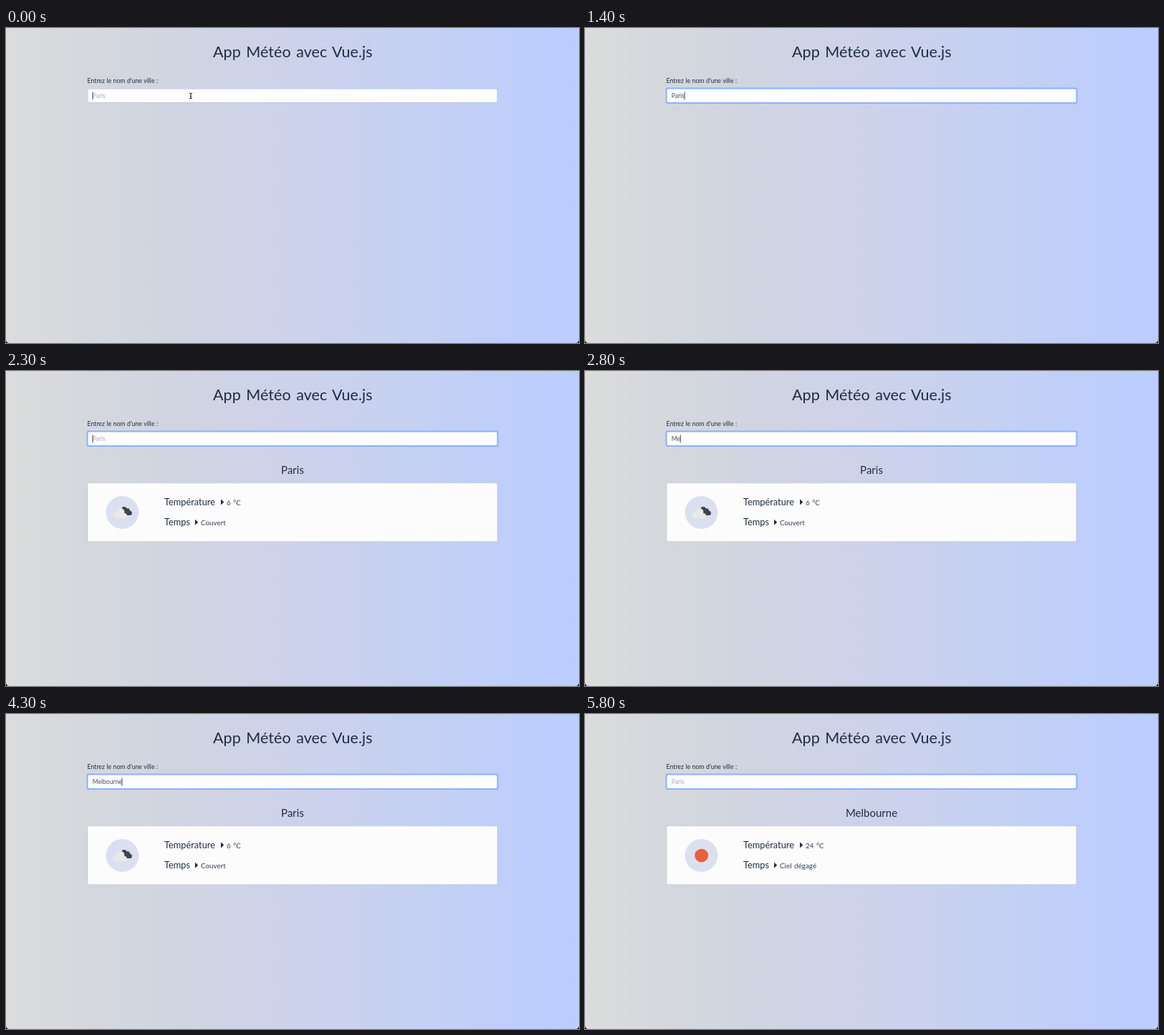
Write an HTML page that moves like this. It is 800 px wide and 441 px high and loops after 6 s.

```html
<!DOCTYPE html>
<html lang="fr">
<head>
<meta charset="utf-8">
<title>App Météo</title>
<style>
  html, body { margin: 0; width: 100%; height: 100%; overflow: hidden; background: #000; }
  svg { display: block; width: 800px; height: 441px; }
  text { font-family: Lato, "Open Sans", sans-serif; fill: #212e40; white-space: pre; }
  .title { font-size: 21.6px; word-spacing: 2px; }
  .label { font-size: 8.7px; word-spacing: .3px; }
  .field { font-size: 8.5px; fill: #495057; }
  .hint { fill: #a9adb1; }
  .city { font-size: 15px; text-anchor: middle; }
  .key { font-size: 12.8px; }
  .value { font-size: 9.9px; word-spacing: 1px; fill: #354052; }
</style>
</head>
<body>
<svg viewBox="0 0 800 441">
  <defs>
    <linearGradient id="sky">
      <stop offset="0" stop-color="#dcdcdb"/>
      <stop offset=".14" stop-color="#d4d8dd"/>
      <stop offset=".3" stop-color="#d0d4e1"/>
      <stop offset=".5" stop-color="#cdd2eb"/>
      <stop offset=".65" stop-color="#c7d1f0"/>
      <stop offset=".82" stop-color="#c1cff7"/>
      <stop offset=".95" stop-color="#bccdff"/>
      <stop offset="1" stop-color="#bbccff"/>
    </linearGradient>
  </defs>
  <path d="M0 0H800V436Q800 441 795 441H5Q0 441 0 436Z" fill="url(#sky)"/>

  <text class="title" x="289" y="40.6">App Météo avec Vue.js</text>
  <text class="label" x="113.6" y="77">Entrez le nom d'une ville :</text>

  <rect id="ring" fill="#8ab2fb"/>
  <rect x="114.5" y="85.5" width="571" height="18.5" rx="1.5" fill="#fdfdfe"/>
  <text id="field" class="field" x="120.8" y="97.8"></text>
  <rect id="caret" y="89.5" width="1" height="10.8" fill="#3f464d"/>
  <path id="beam" d="M256 91.2Q258 91.2 258 92.4Q258 91.2 260 91.2M258 92V98.5M256 99Q258 99 258 97.8Q258 99 260 99M257 95.6H259"
        fill="none" stroke="#15191f" stroke-width="1"/>

  <g id="result">
    <text id="city" class="city" x="400" y="143.8"></text>
    <rect x="114" y="156.8" width="572" height="82" rx="2" fill="#fcfcfd" stroke="#000" stroke-opacity=".13" stroke-width=".7"/>
    <circle cx="162.4" cy="198" r="22.9" fill="#dae0f0"/>
    <g id="clouds">
      <g fill="#42434a">
        <circle cx="165" cy="193.6" r="3.6"/>
        <circle cx="169.5" cy="195.6" r="3.4"/>
        <circle cx="172.7" cy="198.9" r="3.2"/>
        <path d="M163 194L173 202H164Z"/>
      </g>
      <g fill="#e9e9e8">
        <circle cx="159.8" cy="197.5" r="5.6"/>
        <circle cx="153.6" cy="202" r="4.3"/>
        <circle cx="165.2" cy="202.7" r="3.6"/>
        <rect x="153.6" y="199" width="11.6" height="7.3"/>
      </g>
    </g>
    <circle id="sun" cx="162.6" cy="198.2" r="9.4" fill="#e8603c"/>
    <text class="key" x="221" y="187.6">Température</text>
    <path d="M300 179.6L304.2 183.6L300 187.6Z" fill="#1d2b3d"/>
    <text id="temp" class="value" x="308" y="187.6"></text>
    <text class="key" x="221" y="215.8">Temps</text>
    <path d="M264 207.7L268.2 211.7L264 215.7Z" fill="#1d2b3d"/>
    <text id="sky-state" class="value" x="272" y="215.8"></text>
  </g>
</svg>
<script>
  const LOOP = 6000;
  const $ = id => document.getElementById(id);
  const ring = $("ring"), field = $("field"), caret = $("caret");

  // Each word is typed one letter per time, then sent.
  const words = [
    { text: "Paris", keys: [600, 800, 1000, 1200, 1300], sent: 1700, temp: "6 °C", sky: "Couvert" },
    { text: "Melbourne", keys: [2500, 2700, 3000, 3400, 3700, 3800, 4000, 4100, 4300], sent: 4700, temp: "24 °C", sky: "Ciel dégagé", sunny: true }
  ];
  const strokes = [0, ...words.flatMap(w => w.keys)];

  const show = (el, on) => el.setAttribute("visibility", on ? "inherit" : "hidden");
  const set = (el, attrs) => {
    for (const name in attrs) el.setAttribute(name, attrs[name]);
  };

  function typedAt(t) {
    const word = words.find(w => t >= w.keys[0] && t < w.sent);
    return word ? word.text.slice(0, word.keys.filter(k => k <= t).length) : "";
  }

  // The caret restarts its blink at every key.
  function caretOn(t) {
    const last = strokes.filter(k => k <= t).pop();
    return Math.floor((t - last) / 500) % 2 === 0;
  }

  function drawInput(t) {
    const focus = Math.min(Math.floor(t / 100) / 2, 1);
    const grow = 0.2 + 1.6 * focus;
    set(ring, {
      x: 114 - grow + 0.3, y: 85 - grow + 0.3,
      width: 572 + 2 * grow - 0.6, height: 19.5 + 2 * grow - 0.6,
      rx: 1.8 + grow / 2, opacity: 0.6 + 0.4 * focus
    });
    const typed = typedAt(t);
    field.textContent = typed || "Paris";
    field.classList.toggle("hint", !typed);
    const width = typed ? field.getComputedTextLength() : 0;
    caret.setAttribute("x", 120.5 + width);
    show(caret, caretOn(t));
    show($("beam"), t < 600);
  }

  function drawResult(t) {
    const word = words.filter(w => w.sent <= t).pop();
    show($("result"), !!word);
    if (!word) return;
    $("city").textContent = word.text;
    $("temp").textContent = word.temp;
    $("sky-state").textContent = word.sky;
    show($("sun"), word.sunny);
    show($("clouds"), !word.sunny);
  }

  function render(t) {
    drawInput(t);
    drawResult(t);
  }

  const start = performance.now();
  function tick(now) {
    render(Math.max(0, now - start) % LOOP);
    requestAnimationFrame(tick);
  }
  render(0);
  requestAnimationFrame(tick);
</script>
</body>
</html>
```
